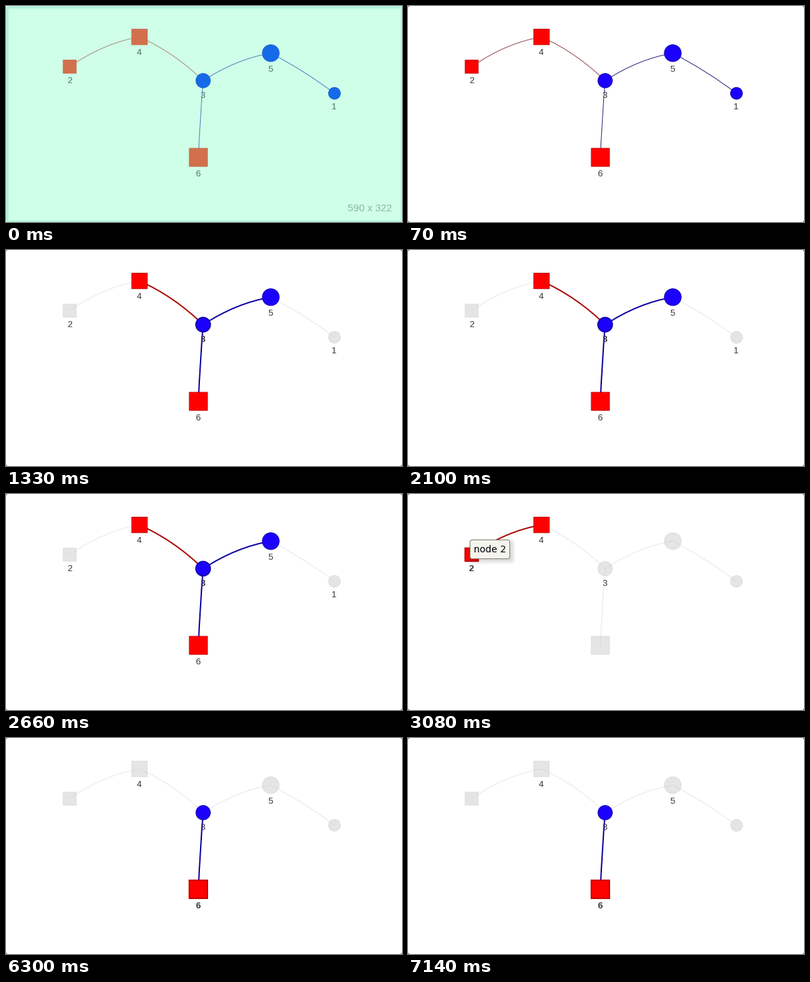
These frames come from a looping animation (590 px wide and 322 px high, 7490 ms). A matplotlib script:

```python
import matplotlib.pyplot as plt
from matplotlib.animation import FuncAnimation
from matplotlib.patches import Circle, FancyBboxPatch, PathPatch, Polygon, Rectangle
from matplotlib.path import Path

W, H, DPI = 590, 322, 100
STEP, FRAMES = 70, 107
PX = 72 / DPI
SCALE = 0.935
SANS = "Liberation Sans"

# node id: centre
NODES = {
    1: (489.4, 130.2), 2: (94.9, 90.4), 3: (293.7, 111.3),
    4: (198.9, 46.1), 5: (394.5, 70.3), 6: (286.6, 225.6),
}
# (start, end): control point of the curve
EDGES = {
    (1, 5): (445, 96.5), (2, 4): (146, 55), (3, 6): (289, 170),
    (4, 3): (251, 69.5), (5, 3): (343, 79),
}
GRAY = (200 / 255, 200 / 255, 200 / 255, 0.46)

# fill, border, thin edge, thick edge for odd (blue) and even (red) nodes
PLAIN = {
    "bg": "#ffffff", "label": "#343434",
    1: ("#1c00ff", "#1200aa", "#14146e", "#0a00a0"),
    0: ("#ff0000", "#be0000", "#8c3838", "#aa0a05"),
}
TINTED = {
    "bg": "#cfffe8", "label": "#4a7565",
    1: ("#166ae8", "#1a62d8", "#3f78bc", "#3f78bc"),
    0: ("#d2704c", "#cc6a48", "#a8826e", "#a8826e"),
}

# (start ms, end ms, node) of each highlight
FOCUS = [(1330, 2870, 3), (2870, 3920, 2), (6300, 7490, 6)]
# (start ms, end ms, node, left, top) of each tooltip
TIPS = [(1540, 2100, 3, 297, 77), (3080, 3640, 2, 92, 68), (6510, 7140, 6, 291, 198)]

fig = plt.figure(figsize=(W / DPI, H / DPI), dpi=DPI)
ax = fig.add_axes([0, 0, 1, 1])


def distances(focus):
    """Number of edges between the focused node and every other node."""
    dist = {focus: 0}
    queue = [focus]
    for node in queue:
        for a, b in EDGES:
            for near, far in ((a, b), (b, a)):
                if near == node and far not in dist:
                    dist[far] = dist[node] + 1
                    queue.append(far)
    return dist


def write(x, y, text, size, color, **kw):
    ax.text(x, y, text, fontsize=size * PX, color=color, va="center", **kw)


def draw_edge(ends, ctrl, focus, theme):
    start, end = ends
    thin, thick = theme[start % 2][2:]
    near = focus in ends
    color = thin if focus is None else thick if near else GRAY
    path = Path([NODES[start], ctrl, NODES[end]],
                [Path.MOVETO, Path.CURVE3, Path.CURVE3])
    ax.add_patch(PathPatch(path, fill=False, ec=color, zorder=1,
                           lw=(2 if near else 0.93) * PX))


def draw_node(node, dist, theme):
    x, y = NODES[node]
    size = (9 + node) * SCALE
    r = size - 0.5
    fill, border = theme[node % 2][:2]
    if dist > 1:
        fill = border = GRAY
    style = dict(fc=fill, ec=border, lw=(1.9 if dist == 0 else 0.95) * PX,
                 zorder=2, snap=False)
    if node % 2:
        ax.add_patch(Circle((x, y), r, **style))
    else:
        ax.add_patch(Rectangle((x - r, y - r), 2 * r, 2 * r, **style))
    if dist <= 2:
        write(x - 0.3, y + size + 11.7, str(node), 13.1, theme["label"], ha="center",
              zorder=3, family=SANS, weight="bold" if dist == 0 else "normal")


def rounded(x, y, w, h, r, **kw):
    ax.add_patch(FancyBboxPatch((x, y), w, h, zorder=5,
                                boxstyle=f"round,pad=0,rounding_size={r}", **kw))


def draw_tip(node, x, y):
    w, h = 60, 29
    for i in range(10):
        g = 5 - i
        rounded(x + 3 - g, y + 3 - g, w + 2 * g, h + 2 * g, max(g, 0) + 3,
                fc=(0, 0, 0, 0.02), ec="none")
    rounded(x + 0.5, y + 0.5, w - 1, h - 1, 3, fc="#f5f4ed", ec="#808074", lw=PX)
    write(x + 6, y + h / 2, f"node {node}", 14, "black", family="DejaVu Sans", zorder=6)


def draw_size_overlay():
    for i in range(4):
        ax.add_patch(Rectangle((i + 0.5, i + 0.5), W - 2 * i - 1, H - 2 * i - 1,
                               fill=False, lw=PX, zorder=7,
                               ec=(0.45, 0.85, 0.72, 0.44 - 0.11 * i)))
    write(509, 301.5, "590 x 322", 15, "#8cb8a4", family=SANS, zorder=7)


def draw_corners():
    for x, dx in ((0, 2), (W, -2)):
        for y, dy in ((0, 2), (H, -2)):
            ax.add_patch(Polygon([(x, y), (x + dx, y), (x, y + dy)],
                                 fc="#707070", ec="none", zorder=8))


def draw(frame):
    t = frame * STEP
    theme = TINTED if frame == 0 else PLAIN
    ax.cla()
    ax.set_xlim(0, W)
    ax.set_ylim(H, 0)
    ax.axis("off")
    fig.set_facecolor(theme["bg"])

    focus = next((n for a, b, n in FOCUS if a <= t < b), None)
    dist = distances(focus) if focus else dict.fromkeys(NODES, 1)
    for ends, ctrl in EDGES.items():
        draw_edge(ends, ctrl, focus, theme)
    for node in NODES:
        draw_node(node, dist[node], theme)
    for a, b, node, x, y in TIPS:
        if a <= t < b:
            draw_tip(node, x, y)
    if frame == 0:
        draw_size_overlay()
    else:
        draw_corners()
    return []


anim = FuncAnimation(fig, draw, frames=FRAMES, interval=STEP,
                     init_func=lambda: draw(0), repeat=True, repeat_delay=0)
plt.show()
```
